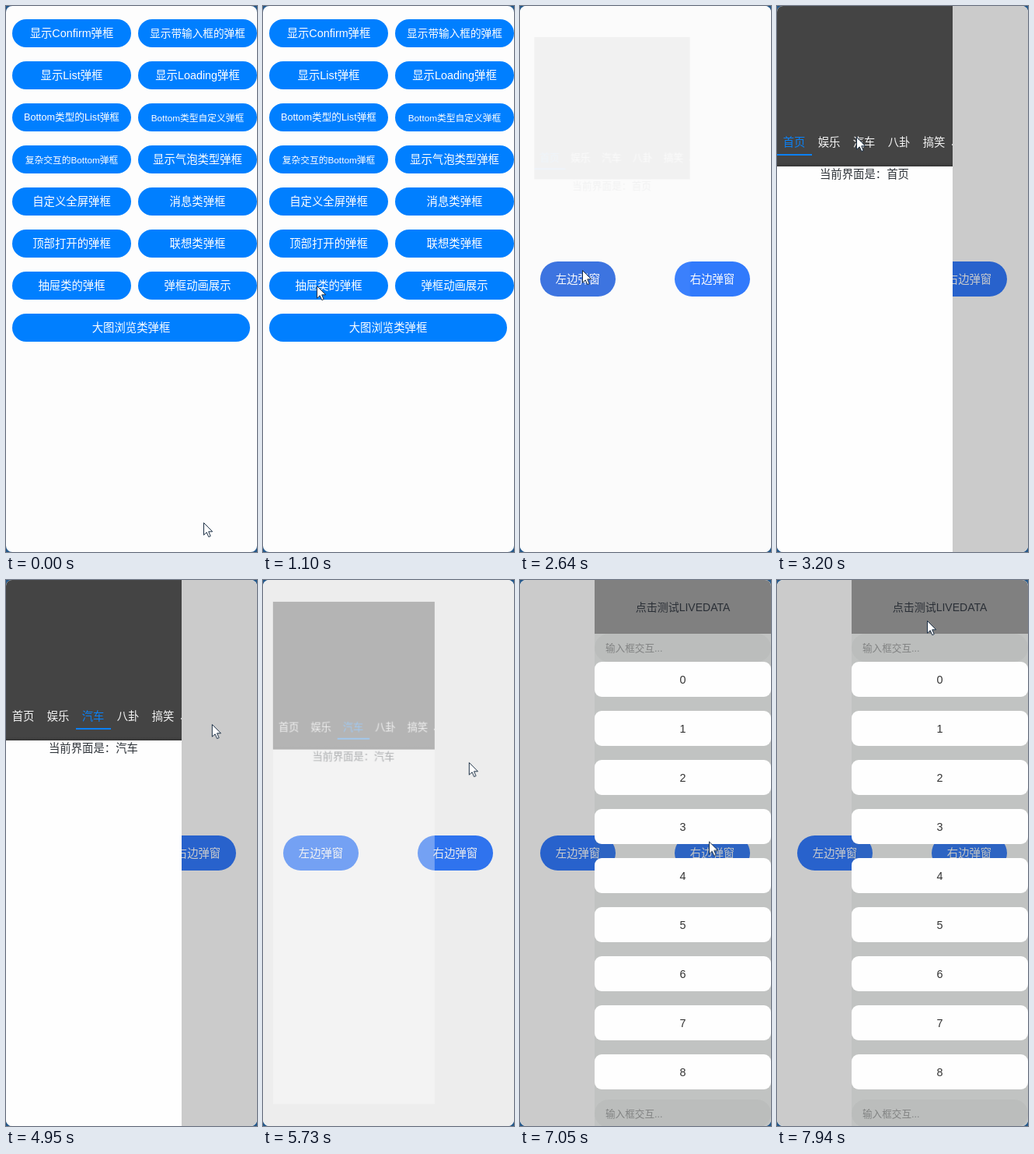
Animation, 323 px wide and 701 px high, one loop 8000 ms. Source, as an HTML page:

```html
<!DOCTYPE html>
<html lang="zh-CN">
<head>
<meta charset="utf-8">
<title>Popups</title>
<style>
html, body { margin: 0; width: 100%; height: 100%; overflow: hidden; background: #24588a; }
* { box-sizing: border-box; }
#stage {
  position: relative; width: 323px; height: 701px; overflow: hidden; border-radius: 8px;
  background: #fdfdfd; color: #333;
  font: 14.36px "Liberation Sans", "Noto Sans CJK SC", "Noto Sans CJK", sans-serif;
}
#stage div, #stage svg { position: absolute; white-space: nowrap; }
.layer { left: 0; top: 0; width: 323px; height: 701px; }
.anim { animation: 8s linear infinite both; }
.pill { text-align: center; color: #fff; }

#list { animation-name: list; }
#list .pill { width: 153px; height: 36px; line-height: 37px; border-radius: 18px; background: #007fff; }
#page { background: #fefefe; animation-name: page; }
#page .pill { top: 327.5px; width: 97px; height: 45px; line-height: 47px; border-radius: 23px; background: #327bff; }
#openLeft { left: 26px; animation-name: pressLeft; }
#openRight { left: 199px; animation-name: pressRight; }
@keyframes list {
  0%, 15.2% { transform: none; animation-timing-function: ease-in-out; }
  20.46%, 100% { transform: translateX(-323px); }
}
@keyframes page {
  0%, 15.2% { transform: translateX(323px); animation-timing-function: ease-in-out; }
  20.46%, 100% { transform: none; }
}
@keyframes pressLeft {
  0%, 32% { background: #327bff; } 32.7%, 35% { background: #346ee2; } 38%, 100% { background: #327bff; }
}
@keyframes pressRight {
  0%, 82% { background: #327bff; } 82.7%, 85% { background: #346ee2; } 88%, 100% { background: #327bff; }
}

#dim { background: #000; animation-name: dim; }
@keyframes dim {
  0%, 32.85% { opacity: 0; } 36%, 68.75% { opacity: .2; }
  73.1%, 82.5% { opacity: 0; } 86.25%, 100% { opacity: .2; }
}

#left { animation-name: left; }
@keyframes left {
  0%, 32.85% { opacity: 0; transform: scale(.88); }
  36%, 68.75% { opacity: 1; transform: none; }
  73.1%, 100% { opacity: 0; transform: scale(.88); }
}
#drawer { width: 226px; height: 701px; background: #fefefe; overflow: hidden; }
#head { width: 226px; height: 206px; background: linear-gradient(#444 201px, #383838); }
.tab { top: 163px; width: 45px; line-height: 24px; text-align: center; color: #f4f4f4; }
.tab:nth-child(1) { animation-name: tabOff; }
.tab:nth-child(3) { animation-name: tabOn; }
#more { left: 225px; top: 177px; width: 1px; height: 2px; background: #ccc; }
#line { left: -.5px; top: 189.5px; width: 45px; height: 2px; background: #0b80f5; animation-name: line; }
.now { left: 55px; top: 204px; line-height: 24px; color: #2f343a; }
#home { animation-name: hide; animation-timing-function: step-end; }
#car { animation-name: show; animation-timing-function: step-end; }
@keyframes tabOff { 0%, 43.8% { color: #0b80f5; } 46.5%, 100% { color: #f4f4f4; } }
@keyframes tabOn { 0%, 43.8% { color: #f4f4f4; } 46.5%, 100% { color: #0b80f5; } }
@keyframes line {
  0%, 43.8% { transform: none; animation-timing-function: ease-in-out; }
  46.5%, 100% { transform: translateX(90px); }
}
@keyframes hide { 0% { opacity: 1; } 45.2%, 100% { opacity: 0; } }
@keyframes show { 0% { opacity: 0; } 45.2%, 100% { opacity: 1; } }

#right { animation-name: right; }
@keyframes right {
  0%, 82.5% { opacity: 0; transform: scale(.88); }
  86.25%, 100% { opacity: 1; transform: none; }
}
#side { left: 96px; width: 227px; height: 701px; background: rgba(100, 125, 112, .09); overflow: hidden; }
#title { width: 227px; height: 69px; line-height: 70px; font-size: 14px; text-align: center; background: #808080; color: #2a2f36; }
.input { width: 227px; height: 36px; line-height: 38px; padding-left: 14px; border-radius: 18px; background: #bbbdbc; color: #808282; font-size: 12.6px; }
.card { width: 227px; height: 45px; line-height: 46px; border-radius: 9px; background: #fefefe; text-align: center; }

#cursor { left: 0; top: 0; overflow: visible; animation-name: cursor; }
@keyframes cursor {
  0%, .9% { transform: translate(254px, 663px); }
  3.75% { transform: translate(190px, 500px); }
  7.5% { transform: translate(90px, 313px); }
  9.5%, 23.4% { transform: translate(69px, 359px); }
  28%, 37.3% { transform: translate(80px, 339px); }
  39.9%, 53% { transform: translate(102px, 168px); }
  61.9% { transform: translate(265px, 185px); }
  63.4%, 70% { transform: translate(273px, 188px); }
  75.6%, 87.5% { transform: translate(245px, 345px); }
  92.25% { transform: translate(230px, 274px); }
  99.2%, 100% { transform: translate(193px, 52px); }
}
</style>
</head>
<body>
<div id="stage">
  <div id="list" class="layer anim"></div>
  <div id="page" class="layer anim">
    <div id="openLeft" class="pill anim">左边弹窗</div>
    <div id="openRight" class="pill anim">右边弹窗</div>
  </div>
  <div id="dim" class="layer anim"></div>
  <div id="left" class="layer anim">
    <div id="drawer">
      <div id="head"></div>
      <div id="tabs"></div>
      <div id="more"></div>
      <div id="line" class="anim"></div>
      <div id="home" class="now anim">当前界面是：首页</div>
      <div id="car" class="now anim">当前界面是：汽车</div>
    </div>
  </div>
  <div id="right" class="layer anim">
    <div id="side">
      <div id="title">点击测试LIVEDATA</div>
      <div class="input" style="top:69px">输入框交互...</div>
      <div class="input" style="top:667px">输入框交互...</div>
    </div>
  </div>
  <svg id="cursor" class="anim" width="13" height="20">
    <path d="M.5 .5V16.2L4.2 12.8L6.8 18.6L9.2 17.6L6.7 11.8H11.7Z" fill="#fff" stroke="#1b2f45"/>
  </svg>
</div>
<script>
const add = (parent, cls, text, style) => {
  const el = document.createElement('div');
  el.className = cls;
  el.textContent = text;
  Object.assign(el.style, style);
  document.getElementById(parent).append(el);
};

const labels = ['显示Confirm弹框', '显示带输入框的弹框', '显示List弹框', '显示Loading弹框',
  'Bottom类型的List弹框', 'Bottom类型自定义弹框', '复杂交互的Bottom弹框', '显示气泡类型弹框',
  '自定义全屏弹框', '消息类弹框', '顶部打开的弹框', '联想类弹框',
  '抽屉类的弹框', '弹框动画展示', '大图浏览类弹框'];
const smallText = { 1: 13.65, 4: 12.65, 5: 11.75, 6: 11.75 };
labels.forEach((label, i) => add('list', 'pill', label, {
  left: (i % 2 ? 170 : 8) + 'px',
  top: 17 + 54 * (i >> 1) + 'px',
  width: i === 14 ? '306px' : '',
  fontSize: smallText[i] ? smallText[i] + 'px' : ''
}));

['首页', '娱乐', '汽车', '八卦', '搞笑'].forEach((name, i) =>
  add('tabs', 'tab anim', name, { left: 45 * i - .5 + 'px', top: '-43px' }));
document.getElementById('tabs').style.top = '206px';

for (let i = 0; i < 9; i++) add('side', 'card', i, { top: 105 + 63 * i + 'px' });
</script>
</body>
</html>
```
